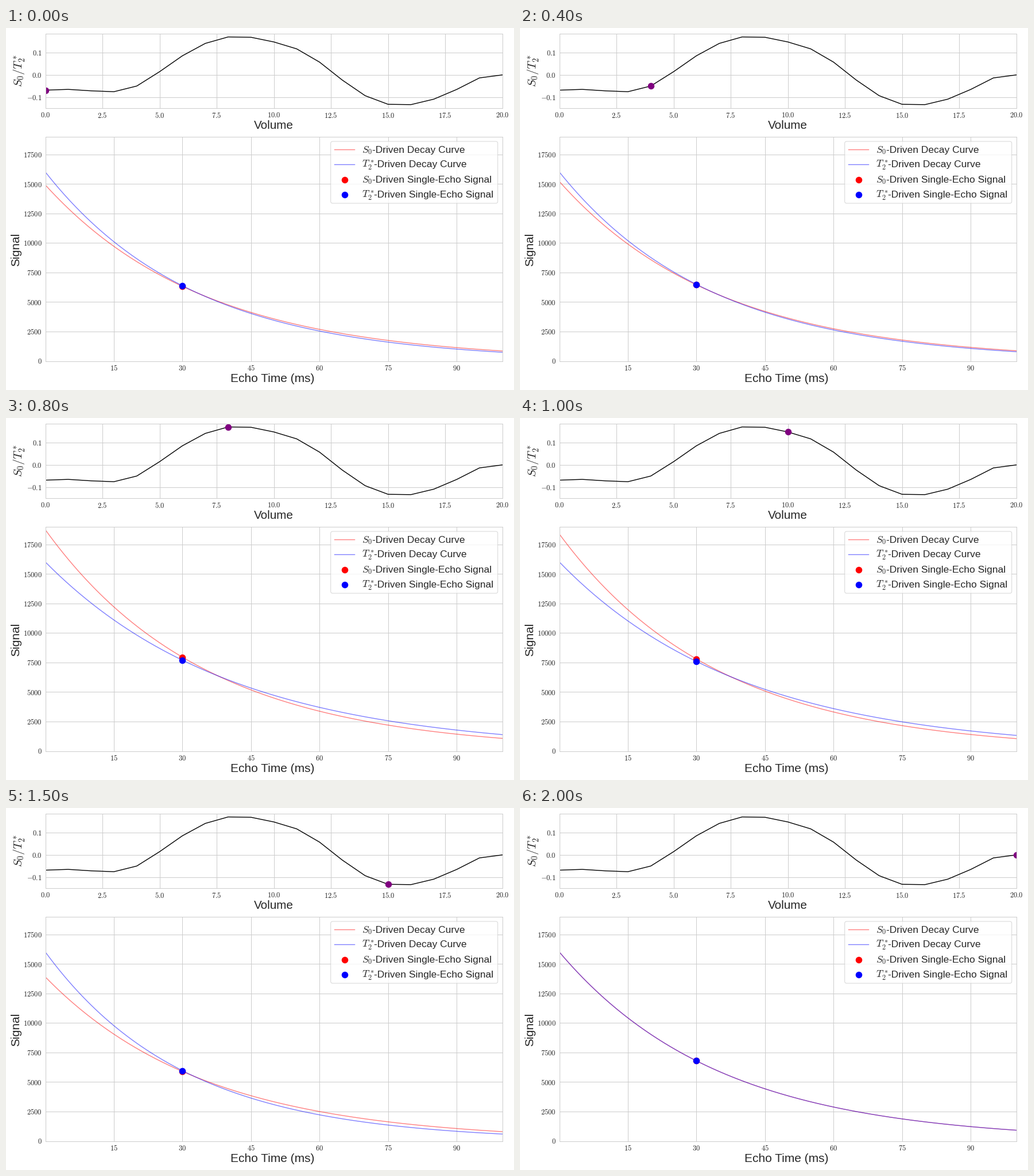
Write a matplotlib script that moves like this. It is 885 px wide and 632 px high and loops after 2.1 s.

```python
import numpy as np
import matplotlib.pyplot as plt
from matplotlib.animation import FuncAnimation
from matplotlib.patches import FancyBboxPatch

W, H, DPI = 885, 632, 72  # at 72 dpi a point is a pixel
INK, GRID = "0.15", "0.8"

plt.rcParams.update({
    "font.family": "Liberation Sans",
    "mathtext.fontset": "cm",
    "text.color": INK,
    "xtick.color": INK,
    "ytick.color": INK,
})

S0, T2, ECHO = 16000, 35, 30
change = np.array([
    -.0685, -.0650, -.0715, -.0755, -.0500, .0145, .0860,
    .1415, .1705, .1690, .1480, .1170, .0575, -.0235,
    -.0935, -.1320, -.1335, -.1090, -.0655, -.0135, 0,
])
volumes = np.arange(len(change))
times = np.linspace(0, 100, 201)


def decay(t, s0, t2):
    return s0 * np.exp(-t / t2)


fig = plt.figure(figsize=(W / DPI, H / DPI), dpi=DPI, facecolor="white")


def panel(top, bottom, xlim, ylim, xticks, yticks, fmt):
    left, right = 68.6, 864.6
    ax = fig.add_axes([left / W, 1 - bottom / H,
                       (right - left) / W, (bottom - top) / H])
    ax.set(xlim=xlim, ylim=ylim)
    ax.set_xticks(xticks, [f"${x:{fmt}}$" for x in xticks])
    ax.set_yticks(yticks, [f"${y:{fmt}}$" for y in yticks])
    ax.tick_params(length=0, pad=6, labelsize=12.5)
    ax.set_axisbelow(True)
    ax.grid(color=GRID, lw=1)
    for spine in ax.spines.values():
        spine.set(color=GRID, lw=1)
    return ax


def label(x, y, text, size, **kw):
    return fig.text(x / W, 1 - y / H, text, fontsize=size, zorder=5, **kw)


def dot(ax, color, x=0, y=0, zorder=2.3):
    return ax.scatter([x], [y], s=100, lw=1.5, color=color, zorder=zorder)


margin = 0.05 * np.ptp(change)
series = panel(9.7, 139.7, (0, 20),
               (change.min() - margin, change.max() + margin),
               np.arange(0, 20.1, 2.5), [-.1, 0, .1], ".1f")
decays = panel(189.6, 581.5, (0, 100), (0, 19000),
               range(15, 91, 15), range(0, 17501, 2500), "d")

series.plot(volumes, change, color="black", lw=1.4)
now = dot(series, "purple")

curve = dict(alpha=0.5, lw=1.4)
s_curve, = decays.plot([], [], color="red", **curve)
t_curve, = decays.plot([], [], color="blue", **curve)
s_dot = dot(decays, "red")
t_dot = dot(decays, "blue", zorder=2.4)

mid = dict(ha="center", va="baseline")
label(466, 176.5, "Volume", 20.6, **mid)
label(464, 617.5, "Echo Time (ms)", 20.9, **mid)
side = dict(rotation=90, ha="center", va="center")
label(17.5, 386.8, "Signal", 20.9, **side)
label(23.6, 74.4, "$S_0/T_2^*$", 20.8, **side)


def legend():
    key = fig.add_axes([0, 0, 1, 1], xlim=(0, W), ylim=(H, 0), zorder=3)
    key.axis("off")
    key.add_patch(FancyBboxPatch(
        (565.7, 198), 291, 108, boxstyle="round,pad=0,rounding_size=3.5",
        fc="white", ec=GRID, lw=1, alpha=0.8))
    rows = (("$S_0$", 637.6, "red", 212, 265.3),
            ("$T_2^*$", 640.8, "blue", 237.7, 291.2))
    for symbol, x, color, line_y, dot_y in rows:
        key.plot([572, 607], [line_y, line_y], color=color, **curve)
        dot(key, color, 590.1, dot_y)
        for y, text in ((line_y + 5.6, "-Driven Decay Curve"),
                        (dot_y + 4.8, "-Driven Single-Echo Signal")):
            label(620.4, y, symbol, 17.4, va="baseline")
            label(x, y, text, 17.4, va="baseline")


legend()


def update(i):
    gain = 1 + change[i]
    now.set_offsets([(volumes[i], change[i])])
    states = (s_curve, s_dot, S0 * gain, T2), (t_curve, t_dot, S0, T2 * gain)
    for line, mark, s0, t2 in states:
        line.set_data(times, decay(times, s0, t2))
        mark.set_offsets([(ECHO, decay(ECHO, s0, t2))])
    return now, s_curve, t_curve, s_dot, t_dot


anim = FuncAnimation(fig, update, frames=len(change), interval=100, repeat=True)
plt.show()
```
